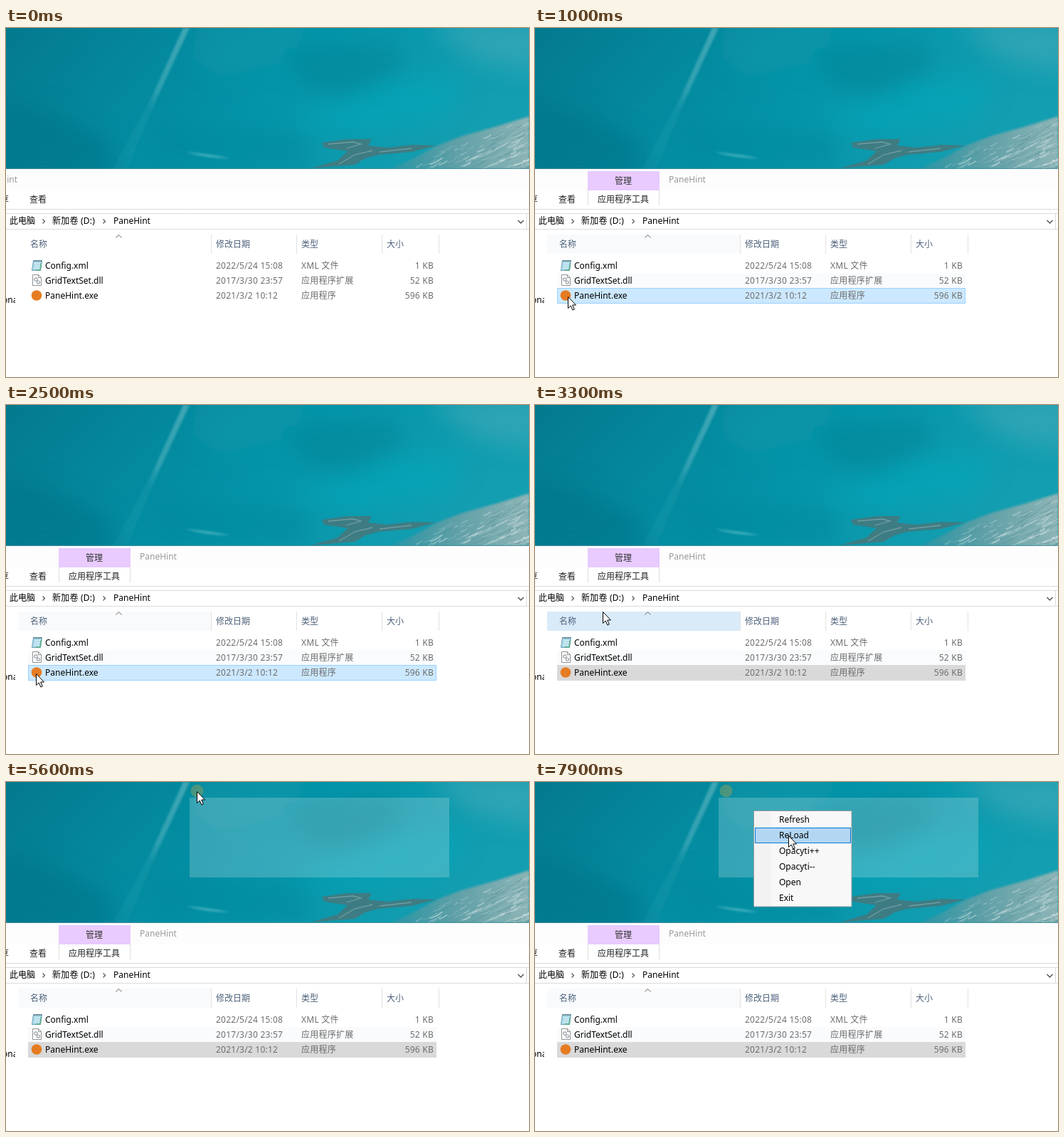
An HTML page that plays this animation: 735 by 490 pixels, repeating every 8 s.

```html
<!DOCTYPE html>
<html lang="zh-CN">
<head>
<meta charset="utf-8">
<title>PaneHint</title>
<style>
html, body { margin: 0; width: 100%; height: 100%; overflow: hidden; background: #fff; }
svg { position: absolute; left: 0; top: 0; width: 735px; height: 490px; display: block; }
text { font: 12px "Noto Sans", "Noto Sans CJK SC", "Noto Sans CJK", sans-serif; white-space: pre; }
.num { letter-spacing: .23px; }
.grey { fill: #6d6d6d; }
.head { fill: #4c607a; }
</style>
</head>
<body>
<svg viewBox="0 0 735 490">
  <defs>
    <linearGradient id="sea" x1="0" y1="0" x2="1" y2=".25">
      <stop offset="0" stop-color="#04798e"/>
      <stop offset=".3" stop-color="#04889d"/>
      <stop offset=".6" stop-color="#0495aa"/>
      <stop offset="1" stop-color="#149eb1"/>
    </linearGradient>
    <linearGradient id="beam" x1="254" y1="0" x2="165" y2="190" gradientUnits="userSpaceOnUse">
      <stop offset="0" stop-color="#7cc4cc" stop-opacity=".5"/>
      <stop offset=".45" stop-color="#62bcc6" stop-opacity=".45"/>
      <stop offset=".6" stop-color="#3fabb9" stop-opacity=".2"/>
      <stop offset="1" stop-color="#3fabb9" stop-opacity=".1"/>
    </linearGradient>
    <linearGradient id="shore">
      <stop offset="0" stop-color="#2795a5"/>
      <stop offset=".45" stop-color="#5d9fa6"/>
      <stop offset="1" stop-color="#8db4b6"/>
    </linearGradient>
    <filter id="soft" x="-40%" y="-40%" width="180%" height="180%"><feGaussianBlur stdDeviation="16"/></filter>
    <filter id="blur" x="-30%" y="-30%" width="160%" height="160%"><feGaussianBlur stdDeviation="1.4"/></filter>
    <clipPath id="sky"><rect width="735" height="198"/></clipPath>
    <clipPath id="nav"><rect y="370" width="13" height="20"/></clipPath>
  </defs>

  <g clip-path="url(#sky)">
    <rect width="735" height="198" fill="url(#sea)"/>
    <g filter="url(#soft)">
      <path d="M-20 95L60 115L150 160L150 215H-20Z" fill="#02748a" opacity=".65"/>
      <path d="M270 -10H430L400 45L300 70L260 40Z" fill="#16a0b1" opacity=".3"/>
      <path d="M385 30L540 20L565 60L480 100L420 80Z" fill="#06788a" opacity=".35"/>
      <path d="M550 70L650 75L610 130L480 150L400 130Z" fill="#02a9bd" opacity=".5"/>
      <path d="M590 -10H750V60L660 45Z" fill="#4aaebb" opacity=".5"/>
      <path d="M210 130L420 145L430 200H200Z" fill="#04859a" opacity=".45"/>
    </g>
    <g filter="url(#blur)">
      <path d="M249 0H258L217 88L182 170L172 198H150L206 94Z" fill="url(#beam)"/>
      <path d="M252 174Q290 177 316 183Q280 183 252 174Z" fill="#7fd0d8" opacity=".5"/>
      <path d="M735 124L690 138L640 152L606 165L575 182L540 198H735Z" fill="url(#shore)"/>
    </g>
    <g id="rock" fill="none" stroke-linecap="round"/>
    <path d="M444 161L480 156L514 156L509 165L535 168L572 164L605 165L570 174L523 178L505 183L490 192L428 197L466 186L480 173L447 168Z" fill="#48777c" opacity=".85"/>
    <path d="M453 163L488 160L499 163L478 169M468 191L490 178L515 172M525 174L570 169" fill="none" stroke="#8fb3b4" stroke-width="1.3" opacity=".6"/>
  </g>

  <rect y="198" width="735" height="292" fill="#fff"/>
  <rect id="bar" y="198" width="735" height="30" fill="#fdfdfd"/>
  <path d="M0 197.500H735" stroke="#4f8a94" opacity=".7"/>
  <text id="shortTitle" x="16" y="217" text-anchor="end" fill="#999">PaneHint</text>
  <g id="tab">
    <rect x="74" y="201" width="101" height="27" fill="#e9cbff"/>
    <path d="M74.500 228V249M174.500 228V249" stroke="#dedede"/>
    <text x="124" y="219" text-anchor="middle" fill="#333">管理</text>
    <text x="88" y="245" fill="#222">应用程序工具</text>
    <text id="title" x="188" y="217">PaneHint</text>
  </g>
  <text x="4" y="245" text-anchor="end" fill="#222">共享</text>
  <text x="33" y="245" fill="#222">查看</text>

  <g fill="none" stroke="#dadbdc">
    <path d="M0 254.500H735M0 260.500H735M0 282.500H735M731.500 260V283"/>
    <path d="M51.500 268.500L54.500 271.500L51.500 274.500M136.500 268.500L139.500 271.500L136.500 274.500" stroke="#555" stroke-width="1.2"/>
    <path d="M719.500 270L723.500 274L727.500 270" stroke="#555" stroke-width="1.5"/>
  </g>
  <text x="5" y="275">此电脑</text>
  <text x="65" y="275" class="num">新加卷 (D:)</text>
  <text x="151" y="275">PaneHint</text>

  <rect id="headHover" x="17" y="290" width="271" height="27"/>
  <path d="M288.500 290V317M408.500 290V317M528.500 290V317M608.500 290V317" stroke="#e2e2e2"/>
  <path d="M154.500 294.500L158.500 290.500L162.500 294.500" fill="none" stroke="#666"/>
  <g class="head">
    <text x="34" y="308">名称</text>
    <text x="295" y="308">修改日期</text>
    <text x="415" y="308">类型</text>
    <text x="535" y="308">大小</text>
  </g>
  <g id="rows"></g>

  <g>
    <path d="M38.500 326.500H50.500L48.500 340.500H36.500Z" fill="#a9d8e8" stroke="#6ba3b8"/>
    <path d="M39 327H50" stroke="#55696f" stroke-width="2" stroke-dasharray="1 1"/>
    <path d="M40 331H48M40 334H47.500M39 337H47" stroke="#e9f7fb"/>
    <path d="M49.500 330L48 340H42" fill="none" stroke="#5fae86" stroke-width="1.5"/>
  </g>
  <g fill="#fff" stroke="#929292">
    <path d="M37.500 346.500H45.500L49.500 350.500V361.500H37.500Z"/>
    <path d="M45.500 346.500V350.500H49.500" fill="none"/>
    <circle cx="42" cy="353" r="2.200" stroke="#98a0a8" stroke-width="1.200"/>
    <circle cx="45.500" cy="357" r="2" stroke="#98a0a8" stroke-width="1.200"/>
  </g>
  <circle cx="43" cy="375.500" r="7.300" fill="#e57c22"/>
  <text x="-5" y="386" clip-path="url(#nav)">onal</text>

  <rect id="chip" x="260" y="1" width="18" height="18" rx="3" fill="#5a6562" opacity=".5"/>
  <circle id="badge" cx="268.500" cy="12.500" r="9" fill="#c9a63c" opacity=".35"/>
  <rect id="panel" x="258" y="22" width="365" height="112" fill="#fff" opacity=".2"/>
  <g id="menu">
    <rect x="307.500" y="40.500" width="137.500" height="134.500" fill="#f8f8f8" stroke="#8f9a9c"/>
    <rect x="309" y="42" width="23" height="132" fill="#f2f2f2"/>
    <rect id="pick" x="309.500" width="134" height="21" fill="#b3d7f3" stroke="#0078d7"/>
  </g>

  <circle id="busy" cx="56.500" cy="377.500" r="6.500" fill="none" stroke="#2f8fdc" stroke-width="3"/>
  <path id="cursor" d="M.5 .5V16.500L4.200 13L6.900 19L9.300 18L6.700 12H11.500Z" fill="#fff" stroke="#000"/>
</svg>
<script>
const $ = id => document.getElementById(id);
const NS = 'http://www.w3.org/2000/svg';
const LOOP = 8000, STEP = 100;

function add(parent, tag, attrs, text) {
  const el = document.createElementNS(NS, tag);
  for (const k in attrs) el.setAttribute(k, attrs[k]);
  if (text) el.textContent = text;
  parent.appendChild(el);
  return el;
}
const show = (id, on) => $(id).setAttribute('visibility', on ? 'visible' : 'hidden');
const fill = (el, color) => el.setAttribute('fill', color);

const files = [
  ['Config.xml', '2022/5/24 15:08', 'XML 文件', '1 KB'],
  ['GridTextSet.dll', '2017/3/30 23:57', '应用程序扩展', '52 KB'],
  ['PaneHint.exe', '2021/3/2 10:12', '应用程序', '596 KB']
];
const rowRects = files.map(([name, date, kind, size], i) => {
  const g = $('rows'), y = 338 + i * 21;
  const rect = add(g, 'rect', { x: 31.5, y: y - 14.5, width: 573, height: 21 });
  add(g, 'text', { x: 55, y }, name);
  add(g, 'text', { x: 295, y, class: 'grey num' }, date);
  add(g, 'text', { x: 415, y, class: 'grey num' }, kind);
  add(g, 'text', { x: 601, y, class: 'grey num', 'text-anchor': 'end' }, size);
  return rect;
});

['Refresh', 'ReLoad', 'Opacyti++', 'Opacyti--', 'Open', 'Exit'].forEach((label, i) =>
  add($('menu'), 'text', { x: 343, y: 57 + i * 22 }, label));

// Foam streaks on the shore, denser and brighter to the right
let seed = 7;
const rnd = () => (seed = seed * 16807 % 2147483647) / 2147483647;
const foam = ['#c5dadb', '#a9cbce', '#568f96', '#e3eceb'];
for (let i = 0; i < 150; i++) {
  const x = 570 + Math.sqrt(rnd()) * 170;
  const top = 198 - (x - 545) * .37;
  const y = top + rnd() * (200 - top);
  const len = 4 + rnd() * 16;
  add($('rock'), 'path', {
    d: `M${x} ${y}q${len / 2} ${-len * .1} ${len} ${-len * .5}`,
    stroke: foam[i % 4], 'stroke-width': .6 + rnd() * 1.4, opacity: .2 + rnd() * .4
  });
}

// Pointer path: time, x, y
const path = [
  [100, 303, 284], [200, 250, 304], [300, 155, 346], [400, 98, 360], [500, 69, 369],
  [600, 55, 374], [700, 48, 377], [800, 46, 377], [1300, 46, 377], [1400, 44, 377],
  [1500, 42, 377], [3000, 42, 377], [3100, 47, 362], [3200, 63, 335], [3300, 95, 290],
  [3500, 185, 145], [3600, 222, 82], [3700, 247, 42], [3800, 260, 21], [3900, 266, 12],
  [4000, 266, 11], [4100, 266, 11], [4200, 274, 12], [4300, 274, 12], [4400, 271, 12],
  [4600, 271, 12], [4800, 269, 14], [5000, 269, 14], [5200, 268, 13], [6000, 268, 13],
  [6300, 307, 40], [7200, 307, 40], [7900, 356, 75]
];

function pointer(t) {
  const i = path.findIndex(p => p[0] >= t);
  if (i < 0) return path[path.length - 1].slice(1);
  if (i === 0) return path[0].slice(1);
  const [t0, x0, y0] = path[i - 1], [t1, x1, y1] = path[i];
  const k = (t - t0) / (t1 - t0);
  return [Math.round(x0 + (x1 - x0) * k), Math.round(y0 + (y1 - y0) * k)];
}

function rowFill(i, hover, t) {
  if (i === 2 && t >= 1000) return hover || t < 3100 ? '#cce8ff' : '#d9d9d9';
  if (hover) return '#e5f3ff';
  return i === 1 && t >= 400 ? '#f9fbfd' : '#fff';
}

function draw(t) {
  const [x, y] = pointer(t);
  const here = t >= 100;
  const inside = (l, top, r, b) => here && x >= l && x < r && y >= top && y < b;

  show('cursor', here);
  $('cursor').setAttribute('transform', `translate(${x} ${y})`);
  show('busy', t >= 2200 && t < 2300);

  const active = t >= 1100 && t < 2500;
  show('shortTitle', t < 1000);
  show('tab', t >= 1000);
  fill($('title'), active ? '#000' : '#999');
  fill($('bar'), active ? '#fff' : '#fdfdfd');

  fill($('headHover'), inside(17, 290, 288, 317) ? '#d9ebf9' : t >= 300 ? '#f8fafc' : '#fff');
  rowRects.forEach((rect, i) => {
    const top = 323 + i * 21;
    const hover = inside(31, top, 605, top + 21);
    const color = rowFill(i, hover, t);
    fill(rect, color);
    rect.setAttribute('stroke', color === '#cce8ff' ? '#99d1ff' : color);
  });

  show('chip', t >= 4000 && t < 4700);
  show('badge', t >= 4700);
  show('panel', t >= 5600);

  const open = t >= 6800;
  show('menu', open);
  show('pick', open && inside(309, 42, 444, 174));
  $('pick').setAttribute('y', 42.5 + Math.floor((y - 42) / 22) * 22);
}

function tick() {
  const t = performance.now() % LOOP;
  draw(Math.floor(t / STEP) * STEP);
  requestAnimationFrame(tick);
}
tick();
</script>
</body>
</html>
```
